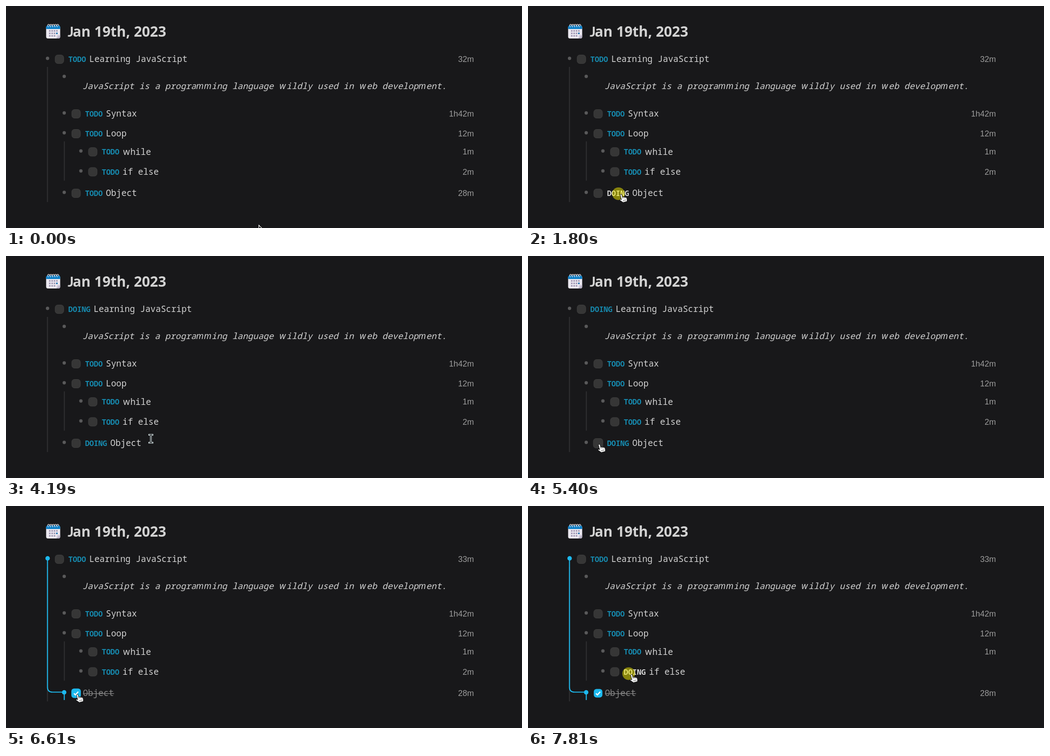
An HTML page for the animation above (8 s loop, 1138 px wide and 492 px high).

```html
<!DOCTYPE html>
<html lang="en">
<head>
<meta charset="utf-8">
<title>Task outline</title>
<style>
html, body { margin: 0; width: 100%; height: 100%; overflow: hidden; background: #18181a; }
svg { display: block; width: 1138px; height: 492px; }
.body { font: 19px "Noto Sans Mono", monospace; text-anchor: middle; fill: #d2d2d2; }
.wide { font-family: "Noto Sans", sans-serif; }
.italic { font-style: italic; }
.label { font: 700 16.2px "Noto Sans Mono", monospace; }
.time { font: 18px "Liberation Sans", Arial, sans-serif; text-anchor: end; fill: #9c9c9c; }
.title { font: 700 31.3px "Open Sans", sans-serif; fill: #d2d2d2; }
.tip { font: 14.9px "Open Sans", sans-serif; fill: #dedede; }
</style>
</head>
<body>
<svg id="stage" viewBox="0 0 1138 492" xmlns="http://www.w3.org/2000/svg"></svg>
<script>
const LOOP = 8000, PITCH = 11.4, INDENT = 36.8;
const BLUE = '#168bb0', CYAN = '#1db9ee', WHITE = '#d8d8d8', RAIL = '#303032', BULLET = '#59595a';
const stage = document.getElementById('stage');

// Each step changes part of the state at its time.
const steps = [
  [0, { root: 'TODO', rootTime: '32m', loop: 'TODO', loopTime: '2m', obj: 'TODO', objTime: '28m',
        objColor: BLUE, loopColor: BLUE, cursor: ['arrow', 557, 485], thread: 0 }],
  [590, { objColor: '#80b4c5', cursor: ['hand', 200, 417] }],
  [1190, { objColor: WHITE, cursor: ['hand', 205, 418] }],
  [1800, { obj: 'DOING', objTime: '', click: [199.5, 416] }],
  [2400, { root: 'DOING', rootTime: '', click: null, tip: true }],
  [4190, { objColor: BLUE, tip: false, cursor: ['beam', 319.5, 405] }],
  [4800, { objColor: WHITE, cursor: ['hand', 204, 414] }],
  [5400, { objColor: BLUE, cursor: ['hand', 157, 418], hover: true }],
  [6010, { click: [152, 416], thread: 0.6 }],
  [6610, { click: null, thread: 1, done: true, root: 'TODO', rootTime: '33m', objTime: '28m' }],
  [7210, { hover: false, loopColor: WHITE, cursor: ['hand', 228, 374] }],
  [7810, { loop: 'DOING', loopTime: '', click: [222, 371.5] }]
];
let acc = {};
const states = steps.map(([at, change]) => ({ at, ...(acc = { ...acc, ...change }) }));

const dot = (x, y, r, fill) => `<circle cx="${x}" cy="${y}" r="${r}" fill="${fill}"/>`;
const box = (x, y, w, h, r, more) =>
  `<rect x="${x}" y="${y}" width="${w}" height="${h}" rx="${r}" ${more}/>`;
const path = (d, more) => `<path d="${d}" ${more}/>`;
const text = (cls, x, y, s, more = '') => `<text class="${cls}" x="${x}" y="${y}" ${more}>${s}</text>`;
const column = level => 91.6 + level * INDENT;

// Duospaced text: m and w take one and a half cells.
function duo(x, y, s, cls = '', more = '') {
  const centres = [...s].map(c => {
    const w = PITCH * (/[mw]/.test(c) ? 1.5 : 1);
    x += w;
    return (x - w / 2).toFixed(2);
  });
  return text('body ' + cls, centres.join(' '), y,
    s.replace(/[mw]/g, '<tspan class="wide">$&</tspan>'), more);
}

function checkbox(x, y, hover, done) {
  const h = hover ? 10.5 : 9.5;
  const look = done ? `fill="${CYAN}"` : 'fill="#363636" stroke="#404040"';
  return box(x - h, y - h, 2 * h, 2 * h, 6, look) + (done
    ? path(`M${x - 4.8} ${y + .3}l3.3 3.3 6.3-7`, 'fill="none" stroke="#fff" stroke-width="2.6"') : '');
}

function task(level, y, label, name, time, color = BLUE, hover = false, done = false) {
  const x = column(level), left = x + 46, base = y + 6.3;
  const out = dot(x, y - 2, 3.7, BULLET) + checkbox(x + 26.2, y, hover, done) +
    text('time', 1032, base - .2, time);
  if (done) {
    return out + duo(x + 41, base, name, '', 'style="fill:#858585"') +
      box(x + 41.5, y, PITCH * name.length, 1.4, 0, 'fill="#858585"');
  }
  return out + text('label', left, base - .2, label, `fill="${color}"`) +
    duo(left + label.length * 9.72 + 7, base, name);
}

function calendar() {
  let s = box(88.5, 44, 31, 28, 4, 'fill="#ebe8f0"') +
    path('M88.5 51v-4a4 4 0 0 1 4-4h23a4 4 0 0 1 4 4v4z', 'fill="#0d80c8"') +
    path('M119.5 64v4a4 4 0 0 1-4 4h-4.5z', 'fill="#b9b2c6"') +
    path('M111 72l1-6q.3-1.8 2-2h5.5z', 'fill="#d3cddd"');
  for (let i = 0; i < 5; i++) {
    s += path(`M${93.5 + i * 5} 47q-3-5.5 0-6.3t3 4`, 'fill="none" stroke="#d9d6dc" stroke-width="1.4"');
  }
  for (let i = 0; i < 11; i++) {
    const x = 95 + i % 4 * 5.2, y = 53.5 + (i >> 2) * 5.5;
    s += box(x, y, 3.2, 3.2, .5, `fill="${i === 7 ? '#0b67a8' : '#9a91ad'}"`);
  }
  return s;
}

function thread(level) {
  if (!level) return '';
  return `<g opacity="${level}">` +
    path('M91.5 116V401.5q0 11 11 11H128.5V430', `fill="none" stroke="${CYAN}" stroke-width="2.2"`) +
    dot(91.8, 116, 4.9, CYAN) + dot(128.3, 413, 4.9, CYAN) + '</g>';
}

const tooltip = () => box(211, 433, 226, 30, 0, 'fill="#232426"') +
  path('M211.5 462.5V433.5H436.5V462.5', 'fill="none" stroke="#c4c4c4"') +
  text('tip', 220.5, 453.3, 'Change from DOING to TODO');

const cursors = {
  arrow: () => path('M.6 .8V17l4-3.6 2.6 6 2.6-1.1-2.6-5.9h5.2z',
    'fill="#111" stroke="#fff" stroke-width="1.2"'),
  hand: () => '<g transform="rotate(-15) scale(.92)">' +
    path('M-1.9 1.2a1.9 1.9 0 0 1 3.8 0V7q3-.9 3.5 1 2.6-.7 3.1 1.2 2.7-.2 2.7 2.2V14q0 3-1.8 5.5H0L-5.5 13q-.9-2 .8-2.5 1.3-.2 2.8 1.8z',
      'fill="#fff" stroke="#111" stroke-width="1" stroke-linejoin="round"') +
    path('M1.9 7.5v3M5.4 8.500v2.5M8.5 9.700v2M2 14v3M4.7 14v3M7.4 14v3',
      'fill="none" stroke="#222" stroke-width=".9"') + '</g>',
  beam: () => [[3.6, '#dfeef0'], [1.5, '#18181a']].map(([w, c]) =>
    path('M-3.4-8.8H-1.4L0-7.6 1.4-8.8H3.4M-3.4 8.8H-1.4L0 7.6 1.4 8.8H3.4M0-7.6V7.6',
      `fill="none" stroke="${c}" stroke-width="${w}" stroke-linecap="${w > 2 ? 'square' : 'butt'}"`)).join('')
};

function draw(s) {
  const [kind, cx, cy] = s.cursor;
  stage.innerHTML = calendar() +
    `<text class="title" y="68"><tspan x="136" style="font-family:Lato,sans-serif">J</tspan>` +
    `<tspan x="147.2">an 19th, 2023</tspan></text>` +
    box(90.4, 135, 2.1, s.done ? 298 : 299.5, 0, `fill="${RAIL}"`) +
    box(127.6, 300, 2.1, 87, 0, `fill="${RAIL}"`) +
    task(0, 118, s.root, 'Learning JavaScript', s.rootTime) +
    dot(column(1), 156, 3.7, BULLET) +
    duo(168.3, 184, 'JavaScript is a programming language wildly used in web development.', 'italic') +
    task(1, 239, 'TODO', 'Syntax', '1h42m') +
    task(1, 283, 'TODO', 'Loop', '12m') +
    task(2, 323.3, 'TODO', 'while', '1m') +
    task(2, 367.5, s.loop, 'if else', s.loopTime, s.loopColor) +
    task(1, 415, s.obj, 'Object', s.objTime, s.objColor, s.hover, s.done) +
    thread(s.thread) +
    (s.tip ? tooltip() : '') +
    (s.click ? `<g opacity=".5">${dot(...s.click, 14, '#f5ee00')}</g>` : '') +
    `<g transform="translate(${cx} ${cy})">${cursors[kind]()}</g>`;
}

let shown = null;
function tick() {
  const t = performance.now() % LOOP;
  const now = states.filter(s => s.at <= t).pop();
  if (now !== shown) draw(shown = now);
  requestAnimationFrame(tick);
}
tick();
</script>
</body>
</html>
```
